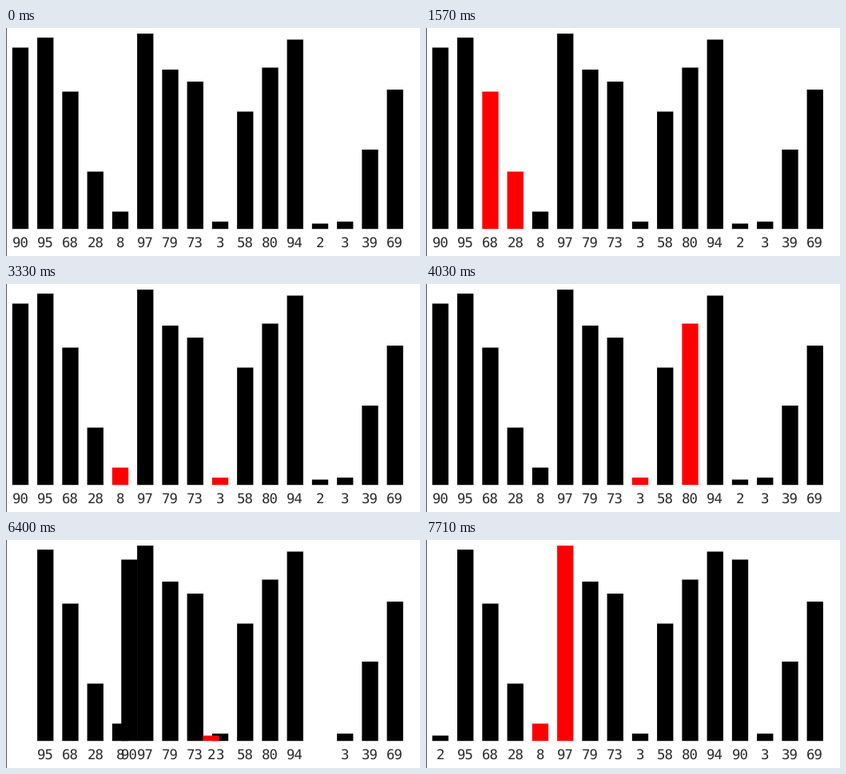
A matplotlib script that plays this animation: 518x285 px, repeating every 8 s.

```python
import numpy as np
import matplotlib.pyplot as plt
from matplotlib.animation import FuncAnimation
from matplotlib.patches import Rectangle

W, H, DPI = 518, 285, 100
LOOP, STEP = 8000, 20
VALUES = [90, 95, 68, 28, 8, 97, 79, 73, 3, 58, 80, 94, 2, 3, 39, 69]
LEFT, PITCH, BAR_W = 7.85, 31.25, 20.3
BASE, UNIT, MIN_HEIGHT = 251.2, 2.5, 1.7

# Moments (ms) at which each comparison of a pass is highlighted
FIRST_PASS = [770, 1170, 1570, 1940, 2250, 2650, 2930, 3330,
              3760, 4030, 4460, 4870, 5270, 5540, 5970]
SECOND_PASS = [6640, 7040, 7440, 7710]
SWAP_SHOWN = [6400, 6520]
SWAP_START, SWAP_LENGTH = 6354, 200


def comparisons(order, start, times):
    """Return (time, smallest slot, compared slot) steps and the minimum's slot."""
    smallest, steps = start, []
    for slot, time in enumerate(times, start + 1):
        steps.append((time, smallest, slot))
        if VALUES[order[slot]] < VALUES[order[smallest]]:
            smallest = slot
    return steps, smallest


def ease(x):
    """Cubic bezier (.25, .1, .25, 1)."""
    s = np.linspace(0, 1, 400)
    bx = 0.75 * s * (1 - s) + s**3
    by = 0.3 * s * (1 - s)**2 + 3 * s**2 * (1 - s) + s**3
    return float(np.interp(x, bx, by))


before = list(range(len(VALUES)))
first_steps, lowest = comparisons(before, 0, FIRST_PASS)
after = before.copy()
after[0], after[lowest] = after[lowest], after[0]
second_steps, _ = comparisons(after, 1, SECOND_PASS)


def state(t):
    """Return the slot position of every bar and the set of red bars."""
    slots = np.arange(len(VALUES), dtype=float)
    if t < SWAP_SHOWN[0]:
        order, steps = before, first_steps
    elif t < SECOND_PASS[0]:
        shown = max(s for s in SWAP_SHOWN if s <= t)
        moved = lowest * ease((shown - SWAP_START) / SWAP_LENGTH)
        slots[0] += moved
        slots[lowest] -= moved
        return slots, {lowest}
    else:
        order, steps = after, second_steps
        slots[[0, lowest]] = lowest, 0
    red = set()
    for time, a, b in steps:
        if time <= t:
            red = {order[a], order[b]}
    return slots, red


plt.rcParams["text.hinting"] = "no_hinting"
fig = plt.figure(figsize=(W / DPI, H / DPI), dpi=DPI, facecolor="white")
ax = fig.add_axes([0, 0, 1, 1])
ax.set_xlim(0, W)
ax.set_ylim(H, 0)
ax.axis("off")
ax.add_patch(Rectangle((0, 0), 1, H, color="#555555", lw=0))

bars, labels = [], []
for i, value in enumerate(VALUES):
    z = 3 if i in (0, lowest) else 2
    height = UNIT * value + MIN_HEIGHT
    bars.append(ax.add_patch(Rectangle((0, BASE - height), BAR_W, height,
                                       lw=0, zorder=z, snap=False)))
    labels.append(ax.text(0, 274, str(value), ha="center", va="baseline",
                          family="DejaVu Sans Mono", color="#2a2a2a",
                          fontsize=17.4 * 72 / DPI, zorder=z))


def draw(frame):
    slots, red = state(frame * STEP + STEP / 2)
    for i, (bar, label) in enumerate(zip(bars, labels)):
        x = LEFT + PITCH * slots[i]
        bar.set_x(x)
        bar.set_facecolor("#ff0000" if i in red else "black")
        label.set_x(x + BAR_W / 2)
    return bars + labels


anim = FuncAnimation(fig, draw, frames=LOOP // STEP, interval=STEP,
                     repeat=True, repeat_delay=0, blit=False)
plt.show()
```
